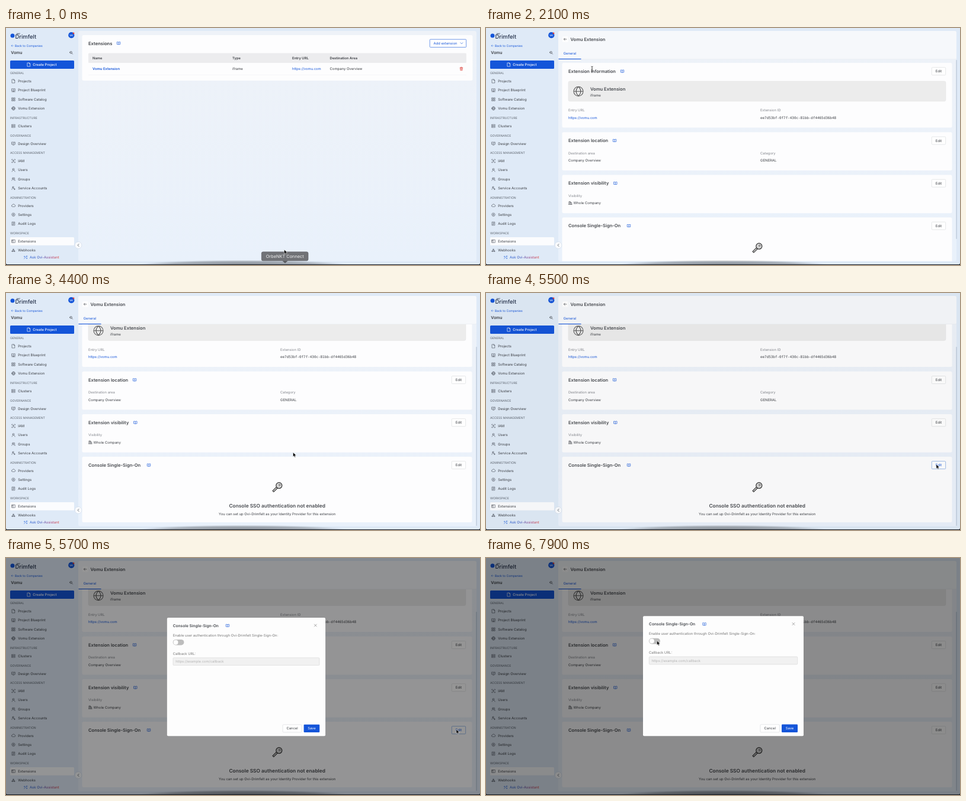
Recreate the animation shown at these times as an HTML page. Size 800 px wide and 401 px high, loop 8 s.

```html
<!DOCTYPE html>
<html lang="en">
<head>
<meta charset="utf-8">
<title>Extensions console</title>
<style>
  html, body { margin: 0; width: 100%; height: 100%; overflow: hidden; background: #dfeaf7; }
  svg { display: block; width: 100vw; height: 100vh; }
  text { font-family: Inter, "Open Sans", sans-serif; text-rendering: geometricPrecision; white-space: pre; }
  .mono { font-family: "DejaVu Sans Mono", monospace; }
</style>
</head>
<body>
<svg id="stage" viewBox="0 0 800 401" preserveAspectRatio="none"></svg>
<script>
const BLUE = '#1455d9', INK = '#3c3f44', GRAY = '#85888e';
const BRAND = 'Ovi-Drimfelt', COMPANY = 'Vomu', SITE = 'https://vomu.com';
const EXT = COMPANY + ' Extension';

// y is the vertical middle of the capitals
const text = (x, y, s, size = 5.93, fill = INK, weight = 400, extra = '') =>
  `<text x="${x}" y="${y + size * 0.36}" font-size="${size}" fill="${fill}" font-weight="${weight}" ${extra}>${s}</text>`;
const rect = (x, y, w, h, fill, r = 0, extra = '') =>
  `<rect x="${x}" y="${y}" width="${w}" height="${h}" rx="${r}" fill="${fill}" ${extra}/>`;
const line = (x, y, d, color = INK, width = 0.65, scale = 1) =>
  `<path transform="translate(${x} ${y}) scale(${scale})" d="${d}" fill="none" stroke="${color}" stroke-width="${width}" stroke-linecap="round" stroke-linejoin="round"/>`;
const ring = (r, x = 0, y = 0) => `M${x - r} ${y}a${r} ${r} 0 1 0 ${2 * r} 0a${r} ${r} 0 1 0 ${-2 * r} 0z`;
const box = (x, y, w, h) => `M${x} ${y}h${w}v${h}h${-w}z`;

const ICON = {
  file: 'M-2.2-3h3l1.4 1.4v4.6h-4.4zM.6-3v1.6h1.6',
  blueprint: box(-2.7, -2.5, 5.4, 3.6) + 'M-2.7 2.6h5.4M0 1v1.6M-1-1h2',
  catalog: box(-2.6, -2.6, 2, 2) + box(0.6, -2.6, 2, 2) + box(-2.6, 0.6, 2, 2) + box(0.6, 0.6, 2, 2),
  globe: ring(2.8) + 'M-2.8 0h5.6M0-2.8c-1.8 1.8-1.8 3.8 0 5.6M0-2.8c1.8 1.8 1.8 3.8 0 5.6',
  cluster: box(-2.6, -2.5, 5.2, 2) + box(-2.6, 0.5, 5.2, 2) + 'M-1.5-1.5h.1M-1.5 1.5h.1',
  design: box(-2.7, -2.4, 5.4, 3.8) + 'M-1.5 0l1-1 .8.7 1.2-1.2M-1 2.6h2',
  iam: ring(0.9, 0, -0.7) + 'M-1.4 1.6q1.4-1.5 2.8 0M-2.8-1.6v-1.2h1.2M1.6-2.8h1.2v1.2M2.8 1.6v1.2h-1.2M-1.6 2.8h-1.2v-1.2',
  user: ring(1.4, 0, -1.3) + 'M-2.5 2.7c.2-3.2 4.8-3.2 5 0',
  group: ring(1.2, -0.8, -1.2) + 'M-2.9 2.4c.2-2.7 4-2.7 4.2 0M1-2.4a1.2 1.2 0 0 1 0 2.4M1.8.6q1 .4 1.1 1.8',
  account: ring(1.2, -0.5, -1.4) + 'M-2.8 2.4c0-2.7 3.4-2.9 4-1.5M.7 1.9h2.1M1.8.9v2',
  provider: 'M-1.6 1.9a1.5 1.5 0 0 1-.2-3 2 2 0 0 1 3.8-.1 1.6 1.6 0 0 1-.1 3.1z',
  gear: ring(1) + 'M-1.4-2.5h2.8l1.5 2.5-1.5 2.5h-2.8l-1.5-2.5z',
  log: box(-2.2, -2.8, 4.4, 5.6) + 'M-1-1.2h2M-1 .1h2M-1 1.4h1',
  ext: box(-2.7, -2.3, 5.4, 4.6) + 'M-.8-2.3v4.6M-2.7-.8h1.9',
  hook: ring(0.8, 0, -1.5) + ring(0.8, -1.8, 1.5) + ring(0.8, 1.8, 1.5) + 'M-.4-.8l-1 1.6M.4-.8l1 1.6M-1 1.5h2',
  book: 'M0-1.7q-1.2-.7-2.7-.5v4h2.2l.5.5.5-.5h2.2v-4q-1.5-.2-2.7.5v3.8',
  trash: 'M-2.4-1.7h4.8M-1-1.8v-.9h2v.9M-1.8-1.6l.2 4.3h3.2l.2-4.3M-.5-.4v1.8M.5-.4v1.8',
  building: 'M-2.3 2.5v-4.8h2.6v4.8M.3-.5h2v3M-2.7 2.5h5.4M-1.3-1h.5M-1.3.5h.5',
  close: 'M-2-2l4 4M2-2l-4 4',
  left: 'M1-2l-2 2 2 2',
  back: 'M2.2 0h-4.4M-.5-1.8L-2.3 0l1.8 1.8',
  search: ring(1.7, -0.4, -0.4) + 'M.9.9l1.5 1.5',
  spark: 'M-2.5 2.5l3.6-3.6M2-2.6v1.6M1.2-1.8h1.7M-1.8-2v1.6M-2.6-1.2h1.6M2 .8v1.6M1.2 1.6h1.6',
};
const book = (x, y) => line(x, y, ICON.book, BLUE);

function sidebar() {
  const sections = [
    ['GENERAL', 76.5], ['INFRASTRUCTURE', 152], ['GOVERNANCE', 181.7], ['ACCESS MANAGEMENT', 211.3],
    ['ADMINISTRATION', 286.8], ['WORKSPACE', 347],
  ];
  const items = [
    ['Projects', 90, 'file'], ['Project Blueprint', 105.3, 'blueprint'], ['Software Catalog', 120.7, 'catalog'],
    [EXT, 136, 'globe'], ['Clusters', 165.8, 'cluster'], ['Design Overview', 195.5, 'design'],
    ['IAM', 225, 'iam'], ['Users', 240.3, 'user'], ['Groups', 255.6, 'group'], ['Service Accounts', 270.8, 'account'],
    ['Providers', 300.5, 'provider'], ['Settings', 315.8, 'gear'], ['Audit Logs', 331, 'log'],
    ['Extensions', 360.8, 'ext'], ['Webhooks', 376.2, 'hook'],
  ];
  return `<circle cx="11" cy="13" r="3.5" fill="${BLUE}"/>`
    + text(17.5, 9, 'ovi', 4.2, '#25314a', 600) + text(15.5, 14.3, 'Drimfelt', 9.4, '#25314a', 500)
    + `<circle cx="110.3" cy="12.2" r="5.1" fill="${BLUE}"/>` + text(110.3, 12.3, 'VK', 4.2, '#fff', 500, 'text-anchor="middle"')
    + '<circle cx="114" cy="9" r="1.4" fill="#e0413c"/>'
    + line(10.7, 30, ICON.back, BLUE, 0.6, 0.75) + text(15, 30, 'Back to Companies', 5.1, BLUE)
    + text(8.3, 42, COMPANY, 6.9, INK, 600) + line(110, 41.7, ICON.search, INK, 0.75)
    + rect(7, 55, 108, 14, BLUE, 1.5) + line(67 - 28.5, 62, ICON.file, '#fff') + text(45.3, 62, 'Create Project', 5.9, '#fff', 500)
    + rect(7, 354, 108, 13.8, '#fbfcfe', 1.5)
    + sections.map(([s, y]) => text(7, y, s, 5.1, '#5d646e')).join('')
    + items.map(([s, y, i]) => line(12.6, y, ICON[i], '#454b55', 0.6) + text(20.2, y, s)).join('')
    + line(33, 388, ICON.spark, 'url(#ask)', 0.6) + text(40, 388, 'Ask Ovi-Assistant', 5.93, 'url(#ask)');
}

function listPage() {
  const heads = [[146, 'Name'], [382, 'Type'], [483, 'Entry URL'], [546.5, 'Destination Area']];
  return rect(128.5, 12, 659, 77, '#fdfdfe', 2.5)
    + text(139, 25.8, 'Extensions', 7.6, INK, 600) + book(190, 25.8)
    + rect(715.3, 19.2, 61.4, 13.4, '#fff', 1.2, `stroke="${BLUE}" stroke-width=".6"`)
    + text(721.5, 25.8, 'Add extension', 5.9, BLUE) + line(769, 25.8, 'M-2-1l2 2 2-2', BLUE)
    + rect(139, 42.5, 638, 16.5, '#ececee', 1.5)
    + heads.map(([x, s]) => text(x, 50.8, s, 5.8, INK, 600)).join('')
    + text(146, 69.2, EXT, 5.9, BLUE, 600) + text(382, 69.2, 'iframe') + text(483, 69.2, SITE, 5.85, BLUE)
    + text(546.5, 69.2, 'Company Overview') + line(768.5, 69, ICON.trash, '#dc3a34')
    + rect(139, 79, 638, 0.5, '#eeeef0');
}

function card(y, h, title, bookX, id = '') {
  return rect(128.5, y, 658, h, '#fdfdfe', 2.5) + text(139, y + 14, title, 7.55, '#46494e', 600) + book(bookX, y + 14.2)
    + `<g ${id}>` + rect(752.3, y + 7.7, 23.4, 13, '#fff', 1.2, 'stroke="#d5d7da" stroke-width=".6"')
    + text(764, y + 14.2, 'Edit', 5.95, INK, 400, 'text-anchor="middle"') + '</g>';
}
const field = (x, y, label, value) => text(x, y, label, 5.85, GRAY) + value;

function detailPage() {
  const key = `<g transform="translate(458 372) rotate(45)" stroke="#333" fill="#d4d4d4">
    <path d="M-1.3 1h2.6v9h-2.6z" stroke-width="1.1"/><circle cy="-4" r="5" stroke-width="1.2"/>
    <circle cy="-5.3" r="1.2" fill="#fff" stroke-width=".8"/></g>`;
  return rect(122, 5, 672, 48, '#f6f8fb', 3)
    + rect(129, 14.3, 9.4, 9.4, '#fff', 1.5) + line(133.7, 19, ICON.back, INK) + text(142.5, 19.2, EXT, 7.55, '#46494e', 600)
    + text(130.8, 43.2, 'General', 5.8, BLUE) + rect(122, 52.6, 672, 0.5, '#e1e5eb') + rect(122.5, 51.9, 38, 1.1, BLUE)
    + '<g clip-path="url(#view)"><g id="scroll">'
    + card(59, 109.5, 'Extension information', 230)
    + rect(139, 90, 637, 34, '#ececec', 2.5, 'stroke="#e0e0e0" stroke-width=".5"')
    + line(156, 107.2, ICON.globe, '#555', 0.36, 2.85)
    + text(176, 103, EXT, 7.6, '#46494e', 600) + text(176, 113.6, 'iframe')
    + field(139, 139.3, 'Entry URL', text(139, 151.8, SITE, 5.85, BLUE))
    + field(463, 139.3, 'Extension ID', text(463, 151.8, 'ee7d53bf-0f7f-430c-81bb-df4465d36b48', 5.91, INK, 400, 'class="mono"'))
    + card(176.3, 64.7, 'Extension location', 217)
    + field(139, 211.5, 'Destination area', text(139, 224, 'Company Overview'))
    + field(463, 211.5, 'Category', text(463, 224, 'GENERAL'))
    + card(248.5, 64.7, 'Extension visibility', 218.3)
    + field(139, 283.7, 'Visibility', line(142.3, 296, ICON.building) + text(147.5, 296.2, 'Whole Company'))
    + card(320.5, 111, 'Console Single-Sign-On', 241, 'id="edit"') + key
    + text(457.7, 403, 'Console SSO authentication not enabled', 8.35, '#46494e', 600, 'text-anchor="middle"')
    + text(457.7, 417, `You can set up ${BRAND} as your Identity Provider for this extension`, 5.93, INK, 400, 'text-anchor="middle"')
    + '</g></g>' + rect(793.3, 54, 1.7, 303, '#c3d0df', 0.8, 'id="thumb"');
}

function modal() {
  return rect(265, 98.3, 271, 203, '#fdfdfd', 2)
    + text(275, 111.7, 'Console Single-Sign-On', 6.7, '#46494e', 600) + book(368.5, 111.9) + line(519, 111.5, ICON.close, '#777')
    + text(275, 128.3, `Enable user authentication through ${BRAND} Single-Sign-On:`, 5.93, '#777')
    + rect(275, 135.8, 19, 9.6, '#bdbdbd', 4.8) + '<circle cx="279.9" cy="140.6" r="4" fill="#fff"/>'
    + text(275, 160, 'Callback URL:', 5.93, '#777')
    + rect(275.3, 167, 250.4, 13, '#f1f1f1', 1.2, 'stroke="#d6d6d6" stroke-width=".6"')
    + text(279.5, 173.5, 'https://example.com/callback', 5.9, '#b4b4b4')
    + rect(463, 281.8, 32.3, 13, '#fff', 1.2, 'stroke="#d5d7da" stroke-width=".6"')
    + text(479.2, 288.3, 'Cancel', 5.9, INK, 400, 'text-anchor="middle"')
    + rect(499, 281.5, 27, 13.5, BLUE, 1.2) + text(512.5, 288.3, 'Save', 5.9, '#fff', 400, 'text-anchor="middle"');
}

const $ = id => document.getElementById(id);
$('stage').innerHTML = `<defs>
    <linearGradient id="ask" gradientUnits="userSpaceOnUse" x1="30" x2="90" y1="0" y2="0">
      <stop stop-color="#2b68dc"/><stop offset=".45" stop-color="#3557c0"/><stop offset=".75" stop-color="#a34a86"/><stop offset="1" stop-color="#e0473e"/></linearGradient>
    <linearGradient id="panel" x2="0" y2="1"><stop stop-color="#eef2f8"/><stop offset="1" stop-color="#e9f1fb"/></linearGradient>
    <radialGradient id="dock" cx=".5" cy="1" r=".5" gradientTransform="translate(0 -1) scale(1 2)">
      <stop stop-opacity=".42"/><stop offset=".7" stop-opacity=".25"/><stop offset="1" stop-opacity="0"/></radialGradient>
    <clipPath id="view"><path d="M122 53.1h672v341.3h-672z"/></clipPath></defs>`
  + rect(0, 0, 800, 401, '#dfeaf7') + sidebar() + rect(122, 5, 672, 389.5, 'url(#panel)', 3)
  + `<g id="list">${listPage()}</g><g id="detail">${detailPage()}</g>`
  + '<circle cx="122" cy="367.5" r="5.8" fill="#fafcff" stroke="#cbd6e4" stroke-width=".6"/>' + line(122, 367.5, ICON.left, INK, 0.75)
  + rect(0, 0, 800, 401, '#000', 0, 'id="mask"') + `<g id="modal">${modal()}</g>`
  + rect(222, 392.5, 356, 8.5, 'url(#dock)') + '<path d="M0 397.5q0 2.6 2.6 2.6h794.8q2.6 0 2.6-2.6v3.5h-800z" fill="#10151c"/>'
  + '<g id="tip">' + rect(431.3, 378.8, 78.7, 15, '#707276', 2.5, 'stroke="#55575b" stroke-width=".6"')
  + '<path d="M466.5 394l4.5 4 4.5-4z" fill="#5b5d61"/>' + text(470.7, 386.3, 'OrbeNKT Connect', 7.35, '#ededed', 400, 'text-anchor="middle"') + '</g>'
  + `<g id="pointer">
    <path id="arrow" d="M0 0v7.2l1.7-1.5 1.1 2.5 1.3-.6-1.1-2.4h2.3z" fill="#000" stroke="#fff" stroke-width=".5"/>
    <path id="hand" d="M-.6 0q.6-.6 1.2 0v2.8l2.6.7q.8.3.7 1.2l-.6 2.9h-3.6l-2.3-3q.5-.9 1.5-.1l.5.4z" fill="#fff" stroke="#000" stroke-width=".6"/>
    <path id="beam" d="M-1.6-4q1.6 0 1.6 1v6.2q0 1-1.6 1M1.6-4q-1.6 0-1.6 1M0 3.2q0 1 1.6 1M-.9.9h1.8" fill="none" stroke="#222" stroke-width=".8"/></g>`;

// time, x, y of the pointer tip
const path = [
  [0, 469.5, 375], [100, 469.5, 375], [200, 469.5, 368], [400, 469.5, 368], [1000, 179, 69], [2200, 179, 69],
  [2900, 268, 236], [3100, 273, 245], [3500, 294.5, 258], [4000, 296, 259], [4900, 748, 285], [5200, 760, 290],
  [5700, 760, 290], [5800, 752, 289], [6000, 603, 243], [6200, 603, 243], [6300, 532.5, 213],
  [6400, 419, 170], [6500, 419, 170], [7100, 296, 146], [7900, 288.5, 140], [8000, 288.5, 140],
];
const clamp = v => Math.min(1, Math.max(0, v));
function pointerAt(t) {
  const i = path.findIndex(p => p[0] > t), [t0, x0, y0] = path[i - 1], [t1, x1, y1] = path[i];
  const p = (t - t0) / (t1 - t0), k = t1 - t0 > 400 ? p * p * (3 - 2 * p) : p;
  return [x0 + (x1 - x0) * k, y0 + (y1 - y0) * k];
}
const show = (id, on) => $(id).style.display = on ? '' : 'none';

function draw(now) {
  const t = Math.floor(now % 8000 / 100) * 100;
  const opened = t >= 1200, scroll = 43.5 * (1 - (1 - clamp((t - 3100) / 900)) ** 2.4);
  show('tip', t < 100);
  show('list', !opened);
  show('detail', opened);
  $('scroll').setAttribute('transform', `translate(0 ${-scroll})`);
  $('thumb').setAttribute('transform', `translate(0 ${scroll * 0.85})`);

  const hot = t >= 5200 && t < 5800, [frame, label] = $('edit').children;
  frame.setAttribute('stroke', hot ? '#5f8fd8' : '#d5d7da');
  label.setAttribute('fill', hot ? BLUE : INK);

  $('mask').setAttribute('opacity', t < 5500 ? 0 : 0.45 * clamp(0.05 + (t - 5500) / 230));
  const zoom = 1 - 0.111 * Math.exp(-(t - 5600) / 48);
  show('modal', t >= 5600);
  $('modal').setAttribute('transform', `translate(760 294) scale(${zoom}) translate(-760 -294)`);
  $('modal').setAttribute('opacity', t < 5700 ? 0.93 : 1);

  const kind = t >= 900 && t < 1200 ? 'hand' : t >= 1200 && t <= 2200 ? 'beam' : 'arrow';
  for (const k of ['arrow', 'hand', 'beam']) show(k, k === kind);
  $('pointer').setAttribute('transform', `translate(${pointerAt(t)})`);
  requestAnimationFrame(draw);
}
requestAnimationFrame(draw);
</script>
</body>
</html>
```
